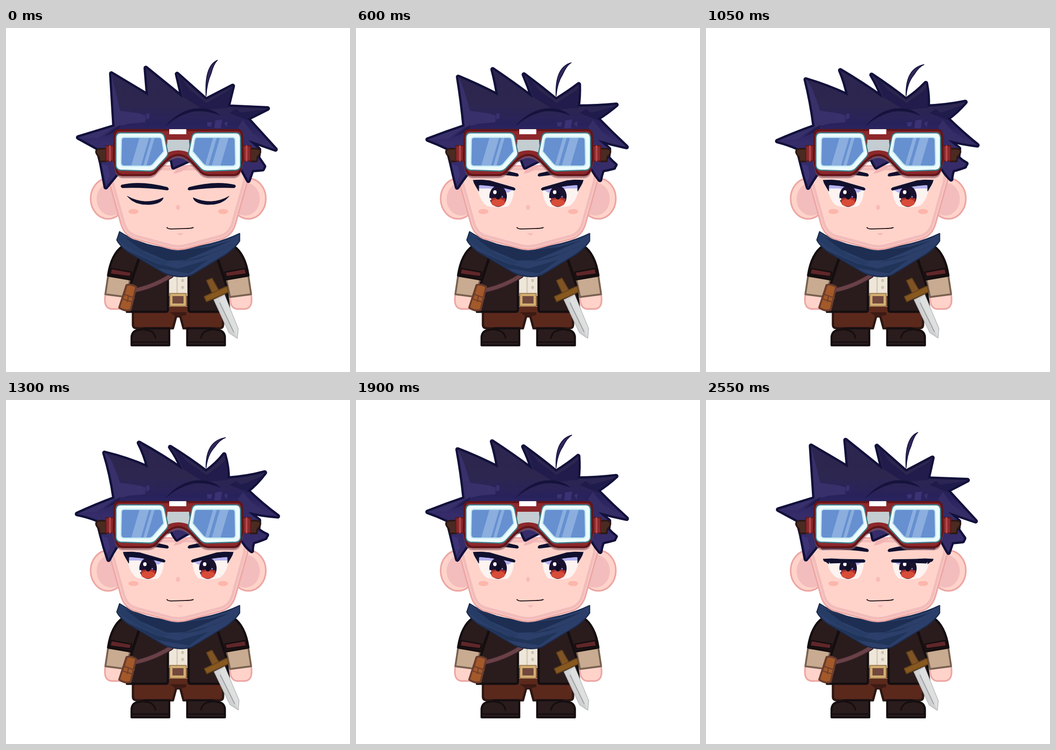
Animation, 748 px wide and 748 px high, one loop 2600 ms. Source, as an HTML page with a canvas:

```html
<!DOCTYPE html>
<html lang="en">
<head>
<meta charset="utf-8">
<title>Goggle boy</title>
<style>
html, body { margin: 0; width: 100%; height: 100%; overflow: hidden; background: #fff; }
canvas { display: block; width: 100vw; height: 100vh; }
</style>
</head>
<body>
<canvas id="stage" width="748" height="748"></canvas>
<script>
const ctx = document.getElementById('stage').getContext('2d');
const LOOP = 2600, STEP = 50;
const INK = '#12113b', BLACK = '#150e10', LEATHER = '#2a1c1c', SKIN = '#ffd3ca';

function shape(path, fill, stroke, width = 4) {
  const p = typeof path === 'string' ? new Path2D(path) : path;
  if (fill) { ctx.fillStyle = fill; ctx.fill(p); }
  if (stroke) { ctx.strokeStyle = stroke; ctx.lineWidth = width; ctx.stroke(p); }
}

function oval(x, y, rx, ry, fill, stroke, width) {
  const p = new Path2D();
  p.ellipse(x, y, rx, ry, 0, 0, Math.PI * 2);
  shape(p, fill, stroke, width);
}

function clipped(path, draw) {
  ctx.save();
  ctx.clip(typeof path === 'string' ? new Path2D(path) : path);
  draw();
  ctx.restore();
}

// Draws a part and its reflection across the body axis.
function both(draw) {
  draw();
  ctx.save();
  ctx.translate(749, 0);
  ctx.scale(-1, 1);
  draw();
  ctx.restore();
}

// Points are [x, y, dx, dy]; edges bend because their middles lag behind the tips.
function bendPath(points, sway) {
  const p = new Path2D();
  const at = ([x, y, dx = 0, dy = 0]) => [x + dx * sway, y + dy * sway];
  p.moveTo(...at(points[0]));
  points.forEach((a, i) => {
    const b = points[(i + 1) % points.length];
    const mid = j => (a[j] + b[j]) / 2;
    const lag = j => ((a[j] || 0) + (b[j] || 0)) * 0.27 * sway;
    p.quadraticCurveTo(mid(0) + lag(2), mid(1) + lag(3), ...at(b));
  });
  p.closePath();
  return p;
}

const HAIR = [
  [157, 238, -2, 8], [199, 261], [207, 293], [217, 346, 5, 1], [240, 318], [330, 290],
  [360, 284], [364, 303, 6, 0], [400, 287], [500, 285], [515, 310, 2, 0],
  [527, 332, 6, -3], [535, 309, 2, 0], [558, 307, 5, -6], [561, 301, 5, -6], [548, 282],
  [550, 264, 0, -2], [526, 243], [586, 264, 4, -9], [525, 197], [569, 175, -5, -14],
  [482, 171], [493, 126, -15, -6], [435, 156], [372, 100, -12, 2], [384, 152],
  [304, 87, -12, 5], [309, 147], [229, 99, -12, 13], [236, 214]
];
const LIGHT_SIDE = [
  [228, 96, -12, 13], [240, 145, -3, 3], [248, 180], [285, 185], [304, 190], [303, 205],
  [268, 208], [236, 216], [200, 239, -1, 3], [154, 240, -2, 8], [236, 212]
];
const CROWN = [
  [374, 97, -12, 2], [399, 134, -4, 0], [436, 163], [482, 137, -6, -3],
  [497, 121, -15, -6], [483, 174], [430, 178], [385, 150]
];
const RIGHT_SHADE = [[572, 176, -5, -14], [510, 184], [500, 176], [486, 185], [527, 201]];
const RIGHT_LIGHT = [[586, 264, 4, -9], [535, 228, 1, -3], [515, 200], [505, 215], [520, 245]];

function drawHair(sway) {
  const hair = bendPath(HAIR, sway);
  const tone = ctx.createLinearGradient(0, 90, 0, 250);
  tone.addColorStop(0, '#2b2550');
  tone.addColorStop(0.45, '#2d274f');
  tone.addColorStop(0.75, '#28225c');
  tone.addColorStop(1, '#352c69');
  shape(hair, null, INK, 10);
  shape(hair, tone);
  clipped(hair, () => {
    shape(bendPath(LIGHT_SIDE, sway), '#37306a');
    shape(bendPath(CROWN, sway), '#211c4b');
    shape(bendPath(RIGHT_SHADE, sway), '#1f1b4b');
    shape(bendPath(RIGHT_LIGHT, sway), '#352d66');
    shape('M345 215Q373 181 410 175Q447 172 467 191Q436 178 406 182Q373 190 345 215Z', '#15133c');
    shape('M288 186H293V202H288ZM305 186H312V196L305 199Z', '#383170');
    shape('M437 205H448L446 214H438ZM455 201L470 199L467 218H453ZM474 207L482 203L480 216Z', '#3a3274');
    shape('M212 237L249 210L246 222Z', '#211c4c');
    shape('M208 296L217 338L226 322L221 300Z', '#3d3478');
  });
  const tx = 460 + 14 * sway, ty = 70 + 9.5 * sway;
  shape(`M435 148Q${431 + 2 * sway} ${82 + 6 * sway} ${tx} ${ty}` +
    `Q${452 + 11 * sway} ${77 + 7 * sway} ${446 + 6 * sway} ${99 + 3 * sway}Q${437 + sway} 119 435 148Z`,
    '#30275a', INK, 1.6);
}

function drawLegs() {
  shape('M276 612H472V645Q472 653 463 653H386L379 627H370L363 653H286Q276 653 276 645Z', '#5b291c', '#2c1712', 5);
  shape('M356 618H392V624L380 627H369Z', '#3d1b14');
  both(() => {
    shape('M273 690V672Q274 657 292 656L303 653H355V690Z', LEATHER, BLACK, 4.5);
    shape('M274 683H355', null, BLACK, 3);
    shape('M301 656Q322 657 325 674', null, BLACK, 3.5);
  });
}

function drawTorso() {
  shape('M345 520H404V606H345Z', '#eee6d9');
  shape('M372 535V582', null, '#d5cab9', 3);
  oval(384, 549, 3, 3.5, '#cfc3b1');
  oval(384, 564, 3, 3.5, '#cfc3b1');
  shape('M347 584H402V604H347Z', '#6b463f', '#442a28', 2);
  shape('M347 606H402V618H347Z', '#5b291c');
  both(() => {
    shape('M216 579Q211 610 230 611H247Q263 609 262 582Z', SKIN, '#eda6a3', 3.5);
    shape('M222 539L270 546L262 585L216 579Z', '#c8ab91', '#79614f', 4);
    shape('M258 469L290 500L270 560L263 617H348Q352 617 352 612V530L300 488Z', LEATHER, BLACK, 5);
    shape('M254 474Q229 491 222 538L273 547L289 500Q275 480 254 474Z', LEATHER, BLACK, 5);
    shape('M229 523L273 531L270 541L226 535Z', '#602629', BLACK, 3);
  });
  shape('M359 580H389V602H359Z', '#72483f', '#d1ad70', 6);
  shape('M356 577H392V605H356Z', null, '#8c673b', 1.5);
  shape('M276 571Q318 564 359 538', null, '#321f24', 12);
  shape('M276 571Q318 564 359 538', null, '#694147', 8);
  shape('M262 559Q272 556 283 563L271 613Q259 617 246 608Z', '#a35929', '#693c2e', 4);
  shape('M257 579L279 587M263 560L257 580L253 589L275 596L278 586M266 584L264 595', null, '#71402c', 2.5);
}

function drawSword(sway) {
  ctx.save();
  ctx.translate(446, 552);
  ctx.rotate(-0.014 * sway);
  ctx.translate(-446, -552);
  shape('M452 591L475 580L505 654L503 675L485 663Z', '#d0d1d2', '#b6b7b8', 1.5);
  shape('M475 581L504 654L502 673L492 650L464 590Z', '#dedfdf');
  shape('M465 598L495 661', null, '#919395', 1.5);
  shape('M436 549L448 544L463 571L449 578Z', '#805325', '#614019', 2);
  shape('M431 584L480 562L484 574L436 595Z', '#87581f', '#68441a', 2);
  ctx.restore();
}

function drawScarf() {
  const scarf = 'M247 443Q300 478 373 480Q450 475 508 447L508 463Q500 476 480 491L404 537Q377 546 344 533L264 486Q246 472 241 461Z';
  shape(scarf, '#2b3f6a');
  clipped(scarf, () => {
    shape('M252 452L290 467L370 485L442 476L490 462L390 505L350 506L290 480Z', '#1d2e52');
    shape('M247 446L310 494L355 510L341 516L289 491L241 461Z', '#263c65');
    shape('M264 484L330 513L374 523L440 504L398 534L375 530L330 522Z', '#203459');
    shape('M505 467L420 502L375 510L439 493Z', '#213559');
  });
  shape(scarf, null, '#1c2c4f', 2.5);
}

function drawHead() {
  both(() => {
    oval(222, 371, 38, 44, SKIN, '#eda6a3', 3.5);
    oval(229, 372, 32, 36, '#f3bdbd');
  });
  const face = 'M222 300L224 333L250 426Q257 450 278 458L352 478Q374 485 397 478L471 458Q492 450 499 426L525 333L527 300Z';
  shape(face, SKIN);
  clipped(face, () => {
    shape(face, null, '#f2bcbb', 19);
    shape(face, null, '#fbcac4', 8);
  });
  shape(face, null, '#eda8a5', 3.5);
  both(() => oval(277, 399, 11, 5.5, '#fcb6ac'));
  oval(374, 390, 4.3, 5.5, '#f8bcb7');
  shape('M371 446H386Q381 452 378 451Z', '#f6bdba');
  shape('M350 434Q352 437 360 437L390 436Q402 436 407 434', null, '#241419', 2.2);
  shape('M364 317Q386 314 402 297L374 301Z', '#f1b5b4');
}

function drawIris(x) {
  oval(x, 366, 19, 23, '#1b1230');
  clipped(`M${x - 18} 371Q${x} 366 ${x + 18} 371V388H${x - 18}Z`, () => {
    oval(x, 371, 16.5, 16, '#ac302e');
    oval(x, 380, 15, 8, '#d84c38');
  });
  oval(x, 364, 6, 9, '#110d26');
  oval(x - 7, 357, 3.8, 4.2, '#fff');
  oval(x + 9, 367, 1.8, 1.8, '#8d86c9');
  oval(x - 17, 372, 2, 2.5, '#fff');
}

// closed: 0 = wide open, 1 = shut
function drawEyes(closed) {
  const lift = -30 * (1 - closed * closed);
  both(() => {
    ctx.save();
    ctx.translate(0, lift);
    shape('M251 341Q293 331 351 346Q357 351 351 353Q298 346 253 348Q247 345 251 341Z', '#10102e');
    ctx.restore();
  });
  if (closed >= 1) {
    both(() => shape('M264 366Q302 387 342 369Q339 382 311 384Q279 385 264 366Z', '#10102e', '#10102e', 1));
    return;
  }
  const drop = 30 * closed, bend = 28 * closed;
  const white = `M263 ${340 + drop * 0.6}L292 ${337 + bend * 0.9}L344 350Q342 378 330 388Q308 392 285 387Q267 376 263 ${340 + drop * 0.6}Z`;
  ctx.save();
  for (const side of [0, 1]) {
    ctx.save();
    if (side) { ctx.translate(749, 0); ctx.scale(-1, 1); }
    shape(white, '#fdf3f0');
    clipped(white, () => {
      shape(`M262 ${340 + drop * 0.4}L290 ${338 + bend * 0.7}L344 350L331 358L290 ${349 + bend * 0.4}L264 ${349 + drop * 0.3}Z`, '#b5b2f0');
      if (side) { ctx.translate(749, 0); ctx.scale(-1, 1); }
      drawIris(side ? 439 : 309);
    });
    const y = 331 + drop, m = 331 + bend;
    shape(`M255 ${y}Q273 ${y - 2} 291 ${m + 1}L343 347Q349 350 344 353` +
      `Q310 ${344 + bend * 0.65} 270 ${m + 10}L267 ${342 + bend * 0.6}L267 ${355 + drop * 0.1}L260 ${343 + drop * 0.55}Q256 ${y + 6} 255 ${y}Z`,
      '#10102e', '#10102e', 1);
    ctx.restore();
  }
  ctx.restore();
}

const GLASS = 'M257 239H333Q337 239 338 244L342 268L320 294Q316 299 310 299H257Q251 299 251 293L252 244Q252 239 257 239Z';

function drawGoggles() {
  const frame = 'M246 222H503Q512 222 513 232L515 285L509 309Q506 319 496 320H440Q427 319 420 309L400 288Q375 264 349 288L329 309Q322 320 309 320H253Q243 319 240 309L234 285L236 232Q238 222 246 222Z';
  both(() => {
    shape('M218 263Q203 261 197 265Q193 271 202 280L204 290H218Z', '#4b2b21', '#2b1712', 3.5);
    shape('M217 256H237V289H217Z', '#8c292b', '#5e181b', 2.5);
    shape('M226 257V288', null, '#b44a4d', 4);
  });
  ctx.save();
  ctx.translate(0, 5);
  shape(frame, 'rgba(141,91,100,.48)', 'rgba(141,91,100,.48)', 4);
  ctx.restore();
  shape(frame, '#8d282b', '#611518', 4.5);
  shape('M351 243H398L400 272Q375 260 349 272Z', '#c4cdd1');
  shape('M354 222H395V236H354Z', '#8d282b');
  shape('M355 220H392V231H355Z', '#fff');
  both(() => {
    shape('M249 228H333Q343 228 345 238L352 272Q352 277 348 281L325 306Q320 311 311 311L249 309Q240 308 239 299V238Q240 228 249 228Z', '#ecfbfd', '#39818f', 2.5);
    shape(GLASS, '#6690d0', '#c2e8f0', 5);
    shape(GLASS, '#6690d0');
  });
  const stripe = (x, w) => shape(`M${x} 236h${w}l-19 65h${-w}Z`, '#8baedf');
  clipped(GLASS, () => { stripe(291, 21); stripe(317, 7); });
  ctx.save();
  ctx.translate(749, 0);
  ctx.scale(-1, 1);
  clipped(GLASS, () => {
    ctx.translate(749, 0);
    ctx.scale(-1, 1);
    stripe(451, 8);
    stripe(466, 19);
  });
  ctx.restore();
}

function render(t) {
  const fromStart = Math.min(t, LOOP - t);
  const sway = fromStart / 1050;
  const closed = Math.max(0, 1 - fromStart / 100);
  ctx.fillStyle = '#fff';
  ctx.fillRect(0, 0, 748, 748);
  ctx.lineJoin = ctx.lineCap = 'round';
  drawLegs();
  drawTorso();
  drawSword(sway);
  drawScarf();
  drawHead();
  drawEyes(closed);
  drawHair(sway);
  drawGoggles();
}

const start = performance.now();
function tick() {
  const t = (performance.now() - start) % LOOP;
  render(Math.floor(t / STEP) * STEP);
  requestAnimationFrame(tick);
}
tick();
</script>
</body>
</html>
```
